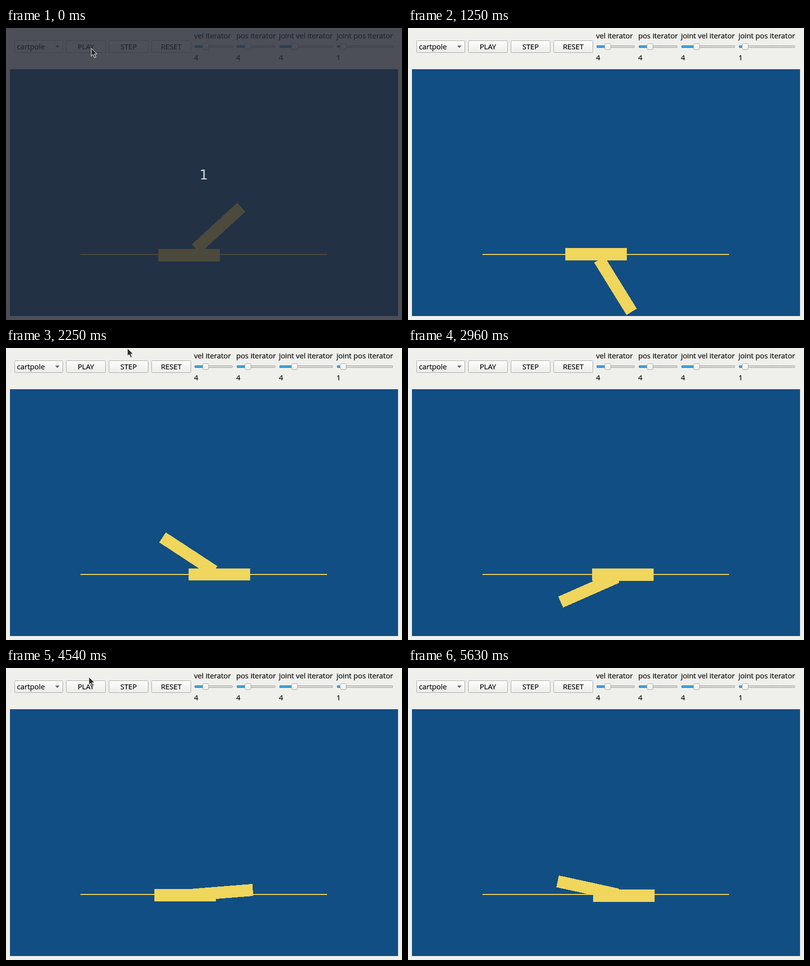
Recreate the animation shown at these times as an HTML page. Size 798 by 588 pixels, loop 5680 ms.

```html
<!DOCTYPE html>
<html lang="en">
<head>
<meta charset="utf-8">
<title>Cart and pole</title>
<style>
  html, body { margin: 0; width: 100%; height: 100%; overflow: hidden; background: #efefeb; }
  svg { display: block; width: 798px; height: 588px; }
  text { font: 14.7px "Open Sans", "Noto Sans", sans-serif; fill: #000; stroke: #000; stroke-width: .2px; }
  .count { font: 27px "DejaVu Sans", sans-serif; fill: #d4d9dd; stroke: none; }
  .mid { text-anchor: middle; }
  .body { fill: #f0d65c; shape-rendering: crispEdges; }
  .box { fill: url(#face); stroke: #a8a9a4; }
  .hover { fill: #f7f7f5; }
  .down { fill: #dadad6; }
</style>
</head>
<body>
<svg viewBox="0 0 798 588">
  <defs>
    <linearGradient id="face" x2="0" y2="1">
      <stop stop-color="#fdfdfd"/><stop offset="1" stop-color="#ecece9"/>
    </linearGradient>
    <clipPath id="view"><rect x="8" y="83" width="782" height="497"/></clipPath>
  </defs>
  <rect width="798" height="588" fill="#efefeb"/>
  <g id="controls"></g>
  <g clip-path="url(#view)">
    <rect x="8" y="83" width="782" height="497" fill="#114e83"/>
    <rect class="body" x="150" y="455" width="497" height="2"/>
    <rect class="body" id="cart" x="-62" y="-12.4" width="124" height="24.8"/>
    <rect class="body" id="pole" x="-62" y="-12.1" width="124" height="24.2"/>
  </g>
  <g id="shade">
    <rect width="798" height="588" fill="#272a36" fill-opacity=".81"/>
    <text class="count mid" x="398.5" y="304.5">1</text>
  </g>
  <path id="cursor" d="M.5 .5V16.5L4.2 13 7 19.5 9.8 18.3 7 12H12Z"
        fill="#2b2b2b" stroke="#fff" stroke-width="1"/>
</svg>
<script>
const LOOP = 5680, STEP = 125 / 3, LAST = 135, RAD = Math.PI / 180;
const $ = id => document.getElementById(id);
const clamp = u => Math.min(1, Math.max(0, u));
const mix = (a, b, u) => a + (b - a) * u;

const button = (label, x) => `
  <rect class="box" id="${label}" x="${x + .5}" y="25.5" width="79" height="24" rx="2"/>
  <text class="mid" x="${x + 40}" y="43">${label}</text>`;

const slider = (label, value, x, end, knob) => `
  <text x="${x - 1}" y="21">${label}</text>
  <rect x="${x + .5}" y="35.5" width="${end - x - 1}" height="4" rx="1.5" fill="#d6d6d2" stroke="#aaaba6"/>
  <rect x="${x + .5}" y="35.5" width="${knob - x}" height="4" rx="1.5" fill="#43a5dc" stroke="#2c79a8"/>
  <rect class="box" x="${knob - 5.5}" y="31.5" width="12" height="12" rx="2.5"/>
  <text x="${x - 1}" y="65">${value}</text>`;

$('controls').innerHTML = `
  <rect class="box" x="17.5" y="25.5" width="97" height="24" rx="2"/>
  <text x="22" y="43">cartpole</text>
  <path d="M99 35.5H108L103.5 40Z" fill="#5c5c5a"/>` +
  button('PLAY', 121) + button('STEP', 207) + button('RESET', 293) +
  slider('vel iterator', 4, 380, 457, 402) +
  slider('pos iterator', 4, 465, 543, 487) +
  slider('joint vel iterator', 4, 551, 659, 581) +
  slider('joint pos iterator', 1, 667, 780, 679);

// Turning points of the pole: time (ms), angle above the right-hand horizontal
const peaks = [[345, 42.4], [2300, -213.5], [4124, 27.7], [5880, -201.3]];

// One swing between two turning points. Speed follows from energy:
// height lost over the effective inertia of a pole on a free cart.
function makeSwing([t0, from], [t1, to]) {
  const N = 240, top = Math.sin(from * RAD), end = Math.sin(to * RAD);
  const angle = i => mix(from, to, (1 - Math.cos(Math.PI * i / N)) / 2);
  const times = [0];
  for (let i = 0; i < N; i++) {
    const a = angle(i + .5), s = Math.sin(a * RAD);
    const fall = mix(top, end, (a - from) / (to - from)) - s;
    const inertia = 20 / 3 + 4.5 * (1 - s * s);
    times.push(times[i] + Math.sin(Math.PI * (i + .5) / N) * Math.sqrt(inertia / fall));
  }
  return t => {
    const want = clamp((t - t0) / (t1 - t0)) * times[N];
    let i = 0;
    while (i < N - 1 && times[i + 1] < want) i++;
    return angle(i + (want - times[i]) / (times[i + 1] - times[i]));
  };
}

const swings = peaks.slice(1).map((peak, i) => makeSwing(peaks[i], peak));
const poleAngle = t => swings[t < peaks[1][0] ? 0 : t < peaks[2][0] ? 1 : 2](t);

// Pointer visits: time, x, y
const visits = [
  [[0, 171.3, 40.3], [540, 171.3, 40.3], [700, 181, 8]],
  [[2120, 246, 0], [2340, 243, 0]],
  [[3500, 284, 0], [3600, 285, 0], [3750, 296, 38], [4330, 234, 46],
   [4540, 166.5, 17.5], [4920, 147, 30], [5120, 82, 4]]
];

function pointerAt(t) {
  const path = visits.find(p => t >= p[0][0] && t <= p[p.length - 1][0]);
  if (!path) return null;
  const i = path.findIndex(key => key[0] >= t) || 1;
  const [a, b] = [path[i - 1], path[i]], u = (t - a[0]) / (b[0] - a[0]);
  return [mix(a[1], b[1], u), mix(a[2], b[2], u)];
}

function place(id, x, y, turn = 0) {
  $(id).setAttribute('transform', `translate(${x} ${y}) rotate(${turn})`);
}

function draw(t) {
  const deg = poleAngle(t);
  const loose = clamp((500 - t) / 155);   // joint is pulled tight after the start
  const reach = 74.5 + 6.5 * loose;
  const y = 455.5 + 2 * loose + .00078 * Math.max(0, t - 1500);
  const half = reach / 2 * Math.cos(deg * RAD);   // equal masses keep their centre still
  place('cart', 398.5 - half, y);
  place('pole', 398.5 + half, y - reach * Math.sin(deg * RAD), -deg);

  const tip = pointerAt(t);
  $('cursor').style.display = tip ? '' : 'none';
  if (tip) place('cursor', ...tip);
  const over = tip && tip[0] > 121 && tip[0] < 201 && tip[1] > 25 && tip[1] < 50;
  const down = t >= 290 && t < 380;
  $('PLAY').setAttribute('class', 'box' + (down ? ' down' : over ? ' hover' : ''));
  $('shade').style.display = t < 40 ? '' : 'none';
}

let start;
function tick(now) {
  start ??= now;
  const t = Math.max(0, now - start) % LOOP;
  const step = Math.min(LAST, Math.floor((t + 4.99) / STEP));
  draw(Math.round(step * STEP / 10) * 10);
  requestAnimationFrame(tick);
}
draw(0);
requestAnimationFrame(tick);
</script>
</body>
</html>
```
